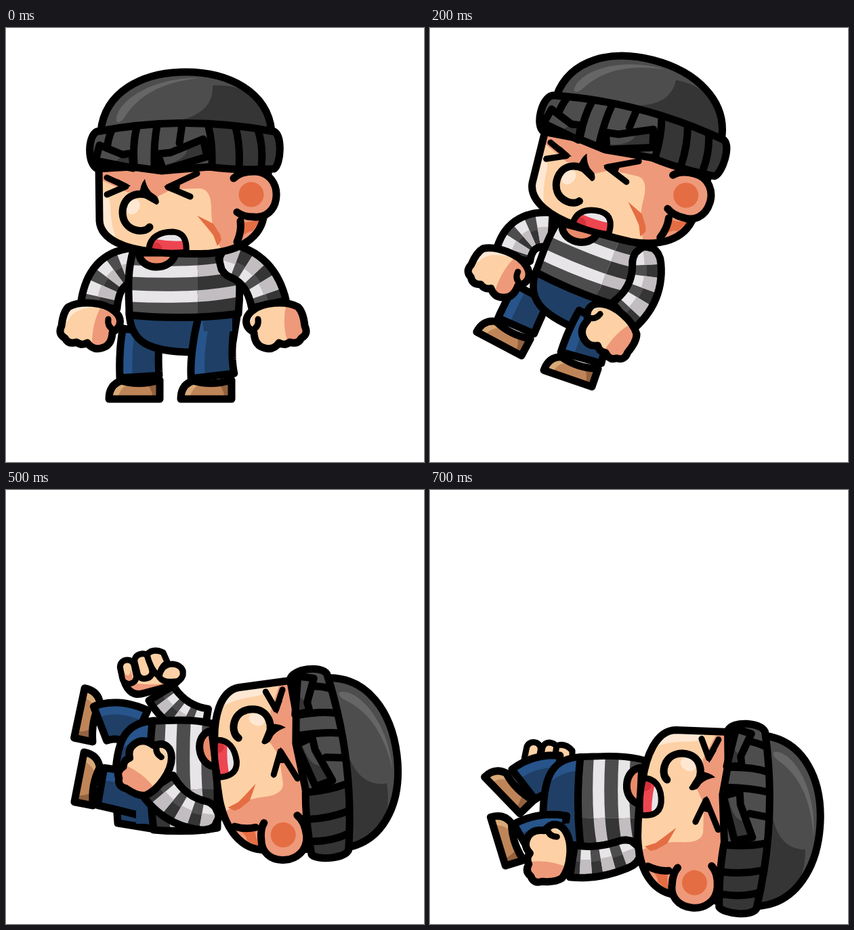
These frames come from a looping animation (617 by 641 pixels, 1000 ms). An HTML page:

```html
<!DOCTYPE html>
<html lang="en">
<head>
<meta charset="utf-8">
<title>Falling burglar</title>
<style>
  html, body { margin: 0; width: 100%; height: 100%; overflow: hidden; background: #fff; }
  svg { display: block; width: 100vw; height: 100vh; }
  .ink { fill: none; stroke: #000; stroke-width: 11; stroke-linecap: round; stroke-linejoin: round; }
  .thin { stroke-width: 9; }
  .skin { fill: #fdd1a5; }
  .blush { fill: #ee997a; }
  .glow { fill: #fee8d3; }
  .rust { fill: #e56d43; }
  .wool { fill: #4d4d4d; }
  .coal { fill: #353535; }
  .denim { fill: #1f3f66; }
  .sky { fill: #27548a; }
</style>
</head>
<body>
<svg viewBox="0 0 617 641">
  <defs>
    <path id="handShape" d="M-33 -28C-15 -38 20 -35 35 -22C47 -12 45 0 37 6L32 10Q31 30 15 33Q3 36 -5 25Q-13 30 -21 24Q-33 28 -38 18Q-49 12 -43 0Q-41 -20 -33 -28Z"/>
    <path id="faceShape" d="M137 205L138 285C140 314 180 327 215 330Q260 335 300 333C345 329 377 310 381 275L388 205Z"/>
    <path id="shirtShape" d="M188 328C177 365 182 400 182 424Q265 432 343 422C346 390 346 360 340 328Z"/>
    <path id="pelvisShape" d="M182 420C183 465 212 478 275 479L333 475L342 420Z"/>
    <path id="domeShape" d="M140 152C146 95 200 65 265 65C330 65 386 95 392 152Z"/>
    <path id="bandShape" d="M134 153Q265 128 396 153C408 160 406 200 396 208Q340 211 300 205L230 211L185 205L135 208C120 202 120 160 134 153Z"/>
    <clipPath id="handClip"><use href="#handShape"/></clipPath>
    <clipPath id="faceClip"><use href="#faceShape"/></clipPath>
    <clipPath id="shirtClip"><use href="#shirtShape"/></clipPath>
    <clipPath id="pelvisClip"><use href="#pelvisShape"/></clipPath>

    <g id="shoe">
      <path fill="#bf8558" d="M-45 35Q-45 14 -27 8Q0 16 30 7V35Z"/>
      <path fill="#d8aa78" d="M-45 35Q-45 14 -27 8L-12 12Q-29 16 -32 35Z"/>
      <path fill="#93623f" d="M11 12L30 7V35H20Q19 22 11 12Z"/>
      <path class="ink" d="M-45 35Q-45 14 -27 8Q0 16 30 7V35Z"/>
    </g>
    <g id="handLines">
      <use href="#handShape" class="ink"/>
      <path class="ink thin" d="M26 -10Q24 2 36 7"/>
    </g>
  </defs>

  <g id="backArm"></g>
  <g id="fist">
    <path class="skin" d="M-40 12Q-32 36 -10 29L24 20Q44 14 46 -4Q42 -18 24 -14Z"/>
    <path class="blush" d="M-38 12Q-30 34 -10 29L24 20Q36 16 40 8Q10 22 -36 12Z"/>
    <path class="ink" d="M-40 10Q-32 36 -10 29L24 20Q44 14 46 -4"/>
    <g class="ink thin">
      <rect class="skin" x="-44" y="-20" width="21" height="35" rx="10" transform="rotate(-12 -34 -2)"/>
      <rect class="skin" x="-22" y="-29" width="22" height="37" rx="10" transform="rotate(-14 -12 -10)"/>
      <path class="skin" d="M-6 -28Q3 -38 18 -31L25 -15Q16 -14 12 4Q0 -4 -6 -28Z"/>
      <path class="skin" d="M12 5Q15 -14 32 -14Q49 -12 47 3Q43 13 33 12Q18 14 12 5Z"/>
    </g>
    <path class="blush" d="M-39 0Q-31 8 -30 -6L-27 8Q-32 14 -38 8Z"/>
  </g>
  <use id="backShoe" href="#shoe"/>
  <g id="backLeg"></g>
  <g class="torso">
    <use href="#pelvisShape" class="denim"/>
    <path id="pelvisGlow" class="sky" clip-path="url(#pelvisClip)" d="M175 420H205Q203 455 240 485H175Z"/>
    <use href="#pelvisShape" class="ink"/>
  </g>
  <use id="frontShoe" href="#shoe"/>
  <g id="frontLeg"></g>
  <g class="torso">
    <path class="denim" d="M289 422H334V448H292Z"/>
    <g clip-path="url(#shirtClip)">
      <rect class="wool" x="170" y="320" width="113" height="115"/>
      <rect class="coal" x="283" y="320" width="70" height="115"/>
      <g fill="none" stroke-width="17">
        <path stroke="#e7e5e8" d="M170 358Q230 362 283 359M170 395Q230 399 283 396"/>
        <path stroke="#c2bdc0" d="M283 359Q315 357 350 349M283 396Q315 394 350 387"/>
      </g>
    </g>
    <use href="#shirtShape" class="ink"/>
  </g>
  <g id="backHand">
    <use href="#handShape" class="skin"/>
    <g clip-path="url(#handClip)">
      <path class="glow" d="M-45 0Q-40 -34 10 -38L30 -28Q-25 -30 -33 -8Z"/>
      <path class="blush" d="M14 -26Q0 0 2 40H50V-26Q30 -18 14 -26Z"/>
    </g>
    <use href="#handLines"/>
  </g>
  <g id="frontArm"></g>
  <g id="frontHand">
    <g transform="scale(-1 1)">
      <use href="#handShape" class="skin"/>
      <g clip-path="url(#handClip)">
        <path class="glow" d="M45 0Q46 -25 10 -38L0 -32Q32 -26 36 -8Z"/>
        <path class="blush" d="M-18 -40Q-5 0 -24 40H-60V-40Z"/>
      </g>
      <use href="#handLines"/>
    </g>
  </g>

  <g id="head">
    <path class="ink blush" style="fill:#e98b6a" d="M196 332C198 360 246 360 250 332Z"/>
    <use href="#faceShape" class="skin"/>
    <g clip-path="url(#faceClip)">
      <path class="glow" d="M130 245Q152 236 154 262Q154 295 168 325H130Z"/>
      <path class="blush" d="M130 200H400V345H330Q302 310 303 265Q302 236 284 237L245 238L222 250L205 238L180 243L142 225Z"/>
      <path class="rust" d="M347 286Q364 289 379 278L364 300Q353 300 345 314Z"/>
    </g>
    <use href="#faceShape" class="ink"/>
    <path class="ink" d="M346 285Q348 300 341 316"/>
    <path class="rust" d="M282 277L306 289L316 305L318 313L312 322L306 306L298 296Z"/>
    <path class="ink" style="fill:#ee997a" d="M336 222Q346 212 366 212C390 212 400 232 399 248C398 270 382 281 366 279Q350 279 341 272"/>
    <circle class="rust" cx="362" cy="246" r="18.5"/>
    <path class="skin" d="M222 257C210 240 172 240 171 273C172 300 205 310 215 292Z"/>
    <ellipse class="glow" cx="188" cy="264" rx="9" ry="12" transform="rotate(30 188 264)"/>
    <path class="ink" d="M218 252C205 240 172 242 172 273C173 300 203 305 212 294"/>
    <path d="M205 223Q198 231 197 247L222 261Q229 259 223 249Q209 242 205 223Z"/>
    <path class="ink thin" d="M149 221L177 234L149 246M282 215L239 235L272 249"/>
    <path d="M165 223L184 233L166 242ZM258 222L233 234L255 246Z"/>
    <path fill="#e7e5e8" d="M211 329C211 308 228 301 246 301C264 302 267 316 266 329Z"/>
    <path fill="#ee4651" d="M211 329Q212 316 221 312Q245 316 266 314V329Z"/>
    <path fill="#d6323c" d="M211 329Q213 316 224 317Q232 321 230 329Z"/>
    <path class="ink thin" d="M211 329C211 308 228 301 246 301C264 302 267 316 266 331Q236 334 211 329Z"/>

    <use href="#domeShape" class="wool"/>
    <path fill="#666" d="M163 138C160 110 215 72 285 74C230 80 195 100 175 132Q168 142 163 138Z"/>
    <path class="coal" d="M305 85Q330 84 345 90C372 105 388 125 392 152L200 142Q308 142 305 85Z"/>
    <use href="#domeShape" class="ink"/>
    <use href="#bandShape" class="wool"/>
    <path class="coal" d="M298 143L304 206Q340 211 396 208C406 200 408 160 396 153Q345 143 298 143Z"/>
    <use href="#bandShape" class="ink"/>
    <path class="ink" d="M156 151Q150 165 149 180M193 147Q187 170 189 200M223 144Q218 170 219 205M260 142L256 170M299 146Q305 170 304 203M339 147Q346 175 344 204M372 151Q380 175 377 204"/>
    <path class="wool" d="M138 173L172 187L186 185L188 207L132 196Z"/>
    <path class="coal" d="M168 192L187 192L188 207L158 201Z"/>
    <path class="ink" d="M138 173L172 187L186 185L188 207L132 196Z"/>
    <path class="wool" d="M224 186L243 184L291 164L297 190L232 210Z"/>
    <path class="coal" d="M268 174L291 164L297 190L232 210L230 203Q270 195 268 174Z"/>
    <path class="ink" d="M224 186L243 184L291 164L297 190L232 210Z"/>
  </g>
</svg>
<script>
const $ = id => document.getElementById(id);

// Key poses. Rigid parts: x, y, angle (, width).
const rigid = {
  head: [[301, 280.5, 0], [310, 265, 14.6], [337.5, 289, 33], [367, 355.5, 63], [367.5, 453, 83], [359, 517.5, 92.8]],
  torso: [[222, 343, 0, 1], [222, 300, 22, .96], [244, 288, 43, .95], [284, 306, 78, .95], [297, 381, 90, 1], [303, 430, 90, .9]],
  backShoe: [[197, 513, 0], [125, 439, 28], [101, 379, 56], [125, 304, 97], [141, 344, 102], [137, 432, 46]],
  frontShoe: [[303, 513, 0], [222, 487, 19], [174, 456, 47], [144, 405, 94], [141, 438, 101], [136, 516, 73]],
  backHand: [[125, 440, 0], [102, 362, 17], [103, 265, 40], [187, 205, 40], [213, 270, 40], [180, 400, 40]],
  fist: [[125, 440, -40], [102, 362, -40], [105, 266, -40], [187, 207, 0], [214, 271, 0], [181, 406, 24]],
  frontHand: [[398, 440, 0], [262, 448, 46], [207, 405, 92], [206, 360, 126], [205, 408, 130], [173, 536, 100]]
};
// Limbs: start, bend and end of a curve, then half widths.
const limbs = {
  backArm: [[192, 350, 143, 352, 137, 412, 25, 27], [180, 298, 130, 293, 122, 340, 25, 26], [210, 285, 172, 290, 138, 287, 24, 20],
    [275, 285, 240, 285, 205, 238, 21, 20], [295, 345, 252, 338, 229, 300, 22, 21], [280, 430, 240, 430, 200, 415, 20, 20]],
  frontArm: [[314, 340, 375, 346, 388, 408, 23, 26], [315, 322, 333, 385, 285, 425, 20, 25], [331, 347, 303, 400, 243, 406, 20, 27],
    [328, 403, 262, 418, 232, 380, 20, 26], [315, 482, 255, 484, 224, 436, 20, 27], [309, 528, 255, 555, 210, 548, 20, 24]],
  backLeg: [[200, 448, 195, 480, 197, 515, 28, 29], [150, 392, 138, 415, 127, 440, 28, 29], [152, 355, 130, 361, 103, 378, 28, 29],
    [185, 305, 150, 290, 123, 304, 26, 27], [198, 350, 165, 335, 139, 345, 27, 27], [190, 420, 160, 418, 138, 435, 28, 28]],
  frontLeg: [[311, 430, 301, 480, 305, 514, 27, 32], [245, 430, 232, 455, 223, 487, 28, 31], [235, 420, 205, 435, 176, 454, 27, 32],
    [222, 412, 185, 408, 143, 405, 30, 30], [225, 455, 180, 445, 140, 438, 32, 28], [198, 506, 165, 501, 137, 517, 25, 27]]
};
// Position on the key poses for each 100 ms step; the raised arm lands late.
const steps = [0, .4, 1, 2, 3, 4, 4.9, 5];
const lateSteps = [0, .4, 1, 2, 3, 4, 4.75, 5];

const lerp = (a, b, t) => a + (b - a) * t;
function sample(track, key) {
  const i = Math.min(Math.floor(key), track.length - 2);
  return track[i].map((v, n) => lerp(v, track[i + 1][n], key - i));
}

// Closed patch of a limb: t runs along it, o across it from -1 to 1.
function patch([ax, ay, cx, cy, bx, by, wa, wb], round, t0, t1, o0, o1) {
  const at = (t, o) => {
    const dx = lerp(cx - ax, bx - cx, t), dy = lerp(cy - ay, by - cy, t);
    const cap = round && t < .2 ? Math.sqrt(1 - (1 - t / .2) ** 2) : 1;
    const k = o * cap * lerp(wa, wb, t) / Math.hypot(dx, dy);
    const x = lerp(lerp(ax, cx, t), lerp(cx, bx, t), t), y = lerp(lerp(ay, cy, t), lerp(cy, by, t), t);
    return (x - dy * k).toFixed(1) + ' ' + (y + dx * k).toFixed(1);
  };
  const n = 18, points = [];
  for (let i = 0; i <= n; i++) points.push(at(lerp(t0, t1, i / n), o0));
  for (let i = n; i >= 0; i--) points.push(at(lerp(t0, t1, i / n), o1));
  return 'M' + points.join('L') + 'Z';
}

const fill = (d, color) => `<path d="${d}" fill="${color}"/>`;
function drawLimb(id, shape) {
  const arm = id.endsWith('Arm');
  const part = (...range) => patch(shape, id === 'frontArm', ...range);
  const whole = part(0, 1, -1, 1);
  const layers = arm
    ? fill(whole, '#4d4d4d') + fill(part(0, 1, -1, 0), '#353535') + [.06, .38, .7].map(t =>
        fill(part(t, t + .17, -1, 1), '#e7e5e8') + fill(part(t, t + .17, -1, .15), '#c2bdc0')).join('')
    : fill(whole, '#1f3f66') + fill(part(0, 1, .35, 1), '#27548a');
  $(id).innerHTML = layers + `<path class="ink" d="${whole}"/>`;
}

const place = ([x, y, angle, width = 1], px = 0, py = 0) =>
  `translate(${x} ${y}) rotate(${angle}) scale(${width} 1) translate(${-px} ${-py})`;

function render(ms) {
  const step = Math.min(Math.floor(ms / 100), steps.length - 1);
  const keyOf = id => (id === 'backArm' || id === 'fist' ? lateSteps : steps)[step];
  for (const id in limbs) drawLimb(id, sample(limbs[id], keyOf(id)));
  for (const id in rigid) {
    const pose = sample(rigid[id], keyOf(id));
    if (id === 'torso') {
      for (const g of document.querySelectorAll('.torso')) g.setAttribute('transform', place(pose, 222, 343));
    } else {
      $(id).setAttribute('transform', id === 'head' ? place(pose, 301, 280.5) : place(pose));
    }
  }
  const raised = steps[step] >= 2;
  $('fist').style.display = raised ? '' : 'none';
  $('backHand').style.display = raised ? 'none' : '';
  $('pelvisGlow').style.display = steps[step] >= 3 ? '' : 'none';
}

let start;
function tick(now) {
  start ??= now;
  render((now - start) % 1000);
  requestAnimationFrame(tick);
}
render(0);
requestAnimationFrame(tick);
</script>
</body>
</html>
```
